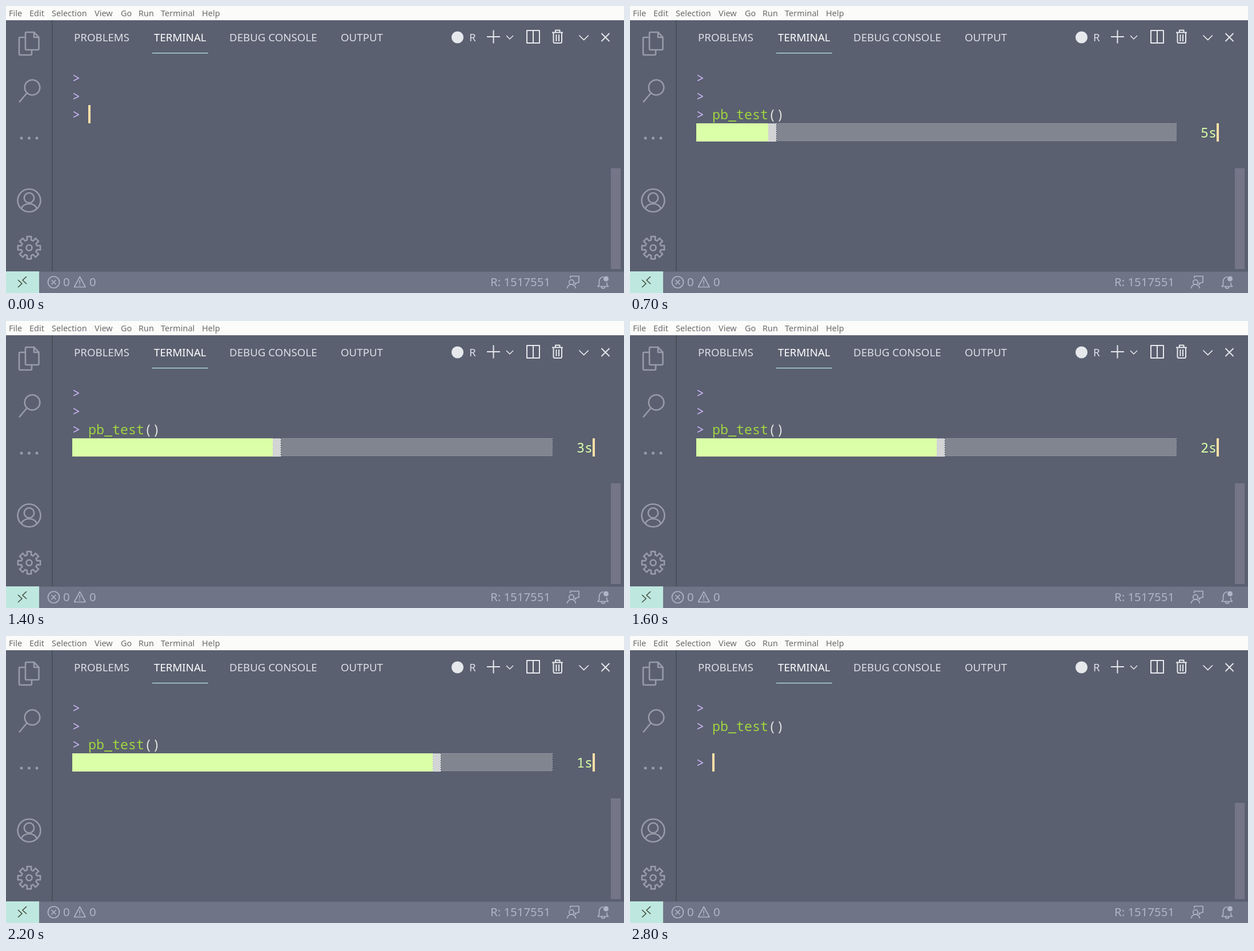
Animation, 1082 px wide and 504 px high, one loop 3.5 s. Source, as an HTML page:

```html
<!DOCTYPE html>
<html lang="en">
<head>
<meta charset="utf-8">
<title>Terminal progress bar</title>
<style>
  html, body { margin: 0; width: 100%; height: 100%; overflow: hidden; background: #5a6070; }
  svg { display: block; font-family: "Noto Sans", "Open Sans", sans-serif; }
  text { white-space: pre; }
  .line { fill: none; stroke-linejoin: round; }
  .menu { font-size: 14.5px; fill: #6b6b6b; }
  .tab { font-size: 18.7px; fill: #dcdfe6; }
  .status { font-size: 20.4px; fill: #b0b5c6; }
  .term { font: 23.36px "Noto Sans Mono", "DejaVu Sans Mono", monospace; }
  .prompt { fill: #cdb5f6; }
</style>
</head>
<body>
<svg width="1082" height="504" viewBox="0 0 1082 504">
  <defs>
    <pattern id="medium" x="116" y="206" width="2" height="4" patternUnits="userSpaceOnUse">
      <path d="M0 0h1v1h-1zM1 2h1v1h-1z" fill="#f4f4ee" shape-rendering="crispEdges"/>
    </pattern>
    <pattern id="dark" x="116" y="206" width="2" height="4" patternUnits="userSpaceOnUse">
      <path d="M1 0h1v1h-1zM0 1h2v1h-2zM0 2h1v1h-1zM0 3h2v1h-2z" fill="#fafaf6" shape-rendering="crispEdges"/>
    </pattern>
  </defs>

  <rect width="1082" height="504" fill="#5a6070"/>
  <rect width="1082" height="25" fill="#fbfbfa"/>
  <g id="menus" class="menu"></g>

  <!-- side bar -->
  <rect x="80" y="25" width="2" height="441" fill="#46525a"/>
  <g class="line" stroke="#989ca9" stroke-width="2.6">
    <path d="M49 46H36q-2 0-2 2V75q0 2 2 2H55.5q2 0 2-2V55L49 46V55h8.5"/>
    <path d="M34 55H25q-2 0-2 2V84q0 2 2 2H43q2 0 2-2V77"/>
    <circle cx="46" cy="143" r="13.3"/>
    <path d="M23 169L36.5 153"/>
    <circle cx="40.5" cy="341.5" r="20"/>
    <circle cx="40.5" cy="337" r="8.7"/>
    <path d="M27 356a13.7 10.5 0 0 1 27 0"/>
    <path id="gear"/>
    <circle cx="40.5" cy="424.5" r="5"/>
  </g>
  <g fill="#989ca9">
    <circle cx="27" cy="232" r="2.5"/>
    <circle cx="40.5" cy="232" r="2.5"/>
    <circle cx="54" cy="232" r="2.5"/>
  </g>

  <!-- panel header -->
  <g id="tabs" class="tab"></g>
  <rect x="256" y="82" width="98" height="1.3" fill="#b5e4dc"/>
  <circle cx="790.5" cy="55" r="10.5" fill="#e6e8ec"/>
  <g class="line" stroke="#e6e8ec" stroke-width="2">
    <path d="M842 54h23M853.5 42.5v23"/>
    <path d="M876 52l6 6 6-6" stroke-width="1.5"/>
    <path d="M912 43h22v22h-22zM923 43v22"/>
    <path d="M956 46.5h19M962 46v-3.5h7.5V46M958.5 47v15.500q0 2.500 2.500 2.500h9.500q2.500 0 2.500-2.500V47M963.500 50v12M968 50v12"/>
    <path d="M1003.500 51.500l8.200 8.200 8.200-8.200" stroke-width="1.700"/>
    <path d="M1042.500 48l14 14M1056.500 48l-14 14"/>
  </g>

  <!-- terminal -->
  <g class="term">
    <g class="prompt">
      <text x="116" y="135">&gt;</text>
      <text x="116" y="167">&gt;</text>
      <text x="116" id="lastPrompt">&gt;</text>
    </g>
    <text x="144" id="command" fill="#a0d440">pb_test<tspan fill="#e0e2dc">()</tspan></text>
    <g id="bar">
      <rect id="rest" y="206" height="32" fill="url(#medium)"/>
      <rect id="head" y="206" height="32" fill="url(#dark)"/>
      <rect id="done" x="116" y="206" height="32" fill="#daffa8"/>
      <text id="eta" x="999" y="231" fill="#daffa8"></text>
    </g>
    <rect id="cursor" width="4" height="32" fill="#ffe0a8"/>
  </g>
  <rect id="scroll" x="1059" width="17" fill="#747688"/>

  <!-- status bar -->
  <rect y="466" width="1082" height="38" fill="#6f7487"/>
  <rect y="466" width="1082" height="1" fill="#656a7b"/>
  <rect y="466" width="58" height="38" fill="#bee7df"/>
  <path class="line" stroke="#3f4a38" stroke-width="1.6" d="M21 481l7 6.500-7 6.500M36 475l-7 6.500 7 6.500"/>
  <g class="line" stroke="#b0b5c6" stroke-width="1.700">
    <circle cx="83.5" cy="485" r="10"/>
    <path d="M79.500 481l8 8M87.500 481l-8 8"/>
    <path d="M129.200 475.500L139 493.500H119.500zM129.200 481.500v6M129.200 489v2"/>
    <circle cx="990" cy="485" r="4.2"/>
    <path d="M982.500 496a7.500 7 0 0 1 15 0M988 478v-3.500h15v11h-3l-3.500 3.500v-3.500"/>
    <path d="M1046 475.500q-7.500 1-7.500 9v5l-2.500 3h18.500l-2.500-3v-4M1042.500 493a3 3 0 0 0 6 0"/>
  </g>
  <circle cx="1050.5" cy="479" r="4.5" fill="#b0b5c6"/>
  <g class="status">
    <text x="100" y="492">0</text>
    <text x="146" y="492">0</text>
    <text x="848" y="492">R: 1517551</text>
  </g>
</svg>
<script>
const LOOP = 3500, LEFT = 116, CELL = 14.02, CELLS = 60, START = 300, END = 2800;
const $ = id => document.getElementById(id);
const set = (id, attrs) => {
  for (const k in attrs) $(id).setAttribute(k, attrs[k]);
};
const show = (id, on) => set(id, { visibility: on ? "visible" : "hidden" });
const col = n => Math.round(LEFT + n * CELL);

const labels = (id, y, items) => {
  $(id).innerHTML = Object.entries(items)
    .map(([word, x]) => `<text x="${x}" y="${y}">${word}</text>`).join("");
};
labels("menus", 18, { File: 5, Edit: 41, Selection: 80, View: 155, Go: 201, Run: 232, Terminal: 271, Help: 343 });
labels("tabs", 62, { PROBLEMS: 119, TERMINAL: 259, "DEBUG CONSOLE": 391, OUTPUT: 586, R: 811 });
$("tabs").children[1].setAttribute("fill", "#fff");

// eight flat teeth around the hub
const gear = [];
for (let i = 0; i < 8; i++)
  for (const [r, a] of [[14, -0.25], [20, -0.19], [20, 0.19], [14, 0.25]]) {
    const t = i * Math.PI / 4 + a;
    gear.push((40.5 + r * Math.sin(t)).toFixed(1) + " " + (424.5 - r * Math.cos(t)).toFixed(1));
  }
set("gear", { d: "M" + gear.join("L") + "Z" });

function draw(t) {
  const running = t >= START && t < END, ended = t >= END;
  const cells = running ? Math.round((t - START) * 0.024) : 0;
  const full = Math.max(cells - 1, 0);

  show("command", t >= 100);
  set("command", { y: ended ? 167 : 199 });
  set("lastPrompt", { y: ended ? 231 : 199 });

  show("bar", running);
  set("done", { width: col(full) - LEFT });
  set("head", { x: col(full), width: col(cells) - col(full) });
  set("rest", { x: col(cells), width: col(CELLS) - col(cells) });
  $("eta").textContent = cells ? Math.floor((CELLS - cells) / 10) + "s" : "";

  const column = running ? 65 : t >= 100 && !ended ? 11 : 2;
  set("cursor", { x: col(column), y: t < START ? 174 : 206 });
  const top = ended ? 293 : 285;
  set("scroll", { y: top, height: 462 - top });
}

function tick() {
  draw(Math.floor(performance.now() % LOOP / 100) * 100);
  requestAnimationFrame(tick);
}
tick();
</script>
</body>
</html>
```
